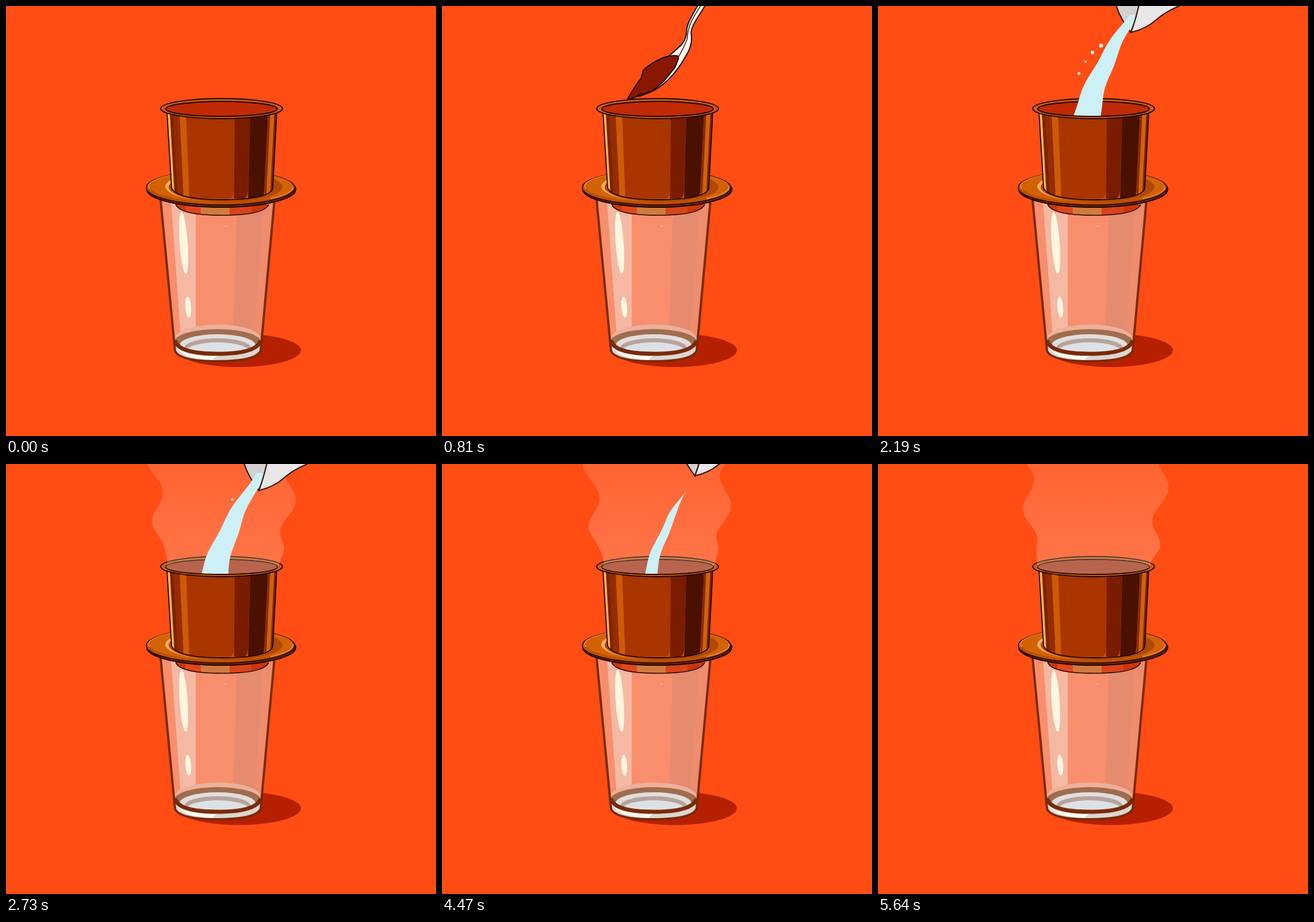
An HTML page that plays this animation: 748 px wide and 748 px high, repeating every 5670 ms.

```html
<!DOCTYPE html>
<html lang="en">
<head>
<meta charset="utf-8">
<title>Drip coffee</title>
<style>
  html, body { margin: 0; height: 100%; overflow: hidden; background: #ff4d14; }
  svg { display: block; width: 100%; height: 100%; }
</style>
</head>
<body>
<svg viewBox="0 0 748 748">
  <defs>
    <linearGradient id="mist" gradientUnits="userSpaceOnUse" x1="0" y1="0" x2="0" y2="190">
      <stop offset="0" stop-color="#fff" stop-opacity=".13"/>
      <stop offset="1" stop-color="#fff" stop-opacity=".23"/>
    </linearGradient>
    <clipPath id="glassClip"><path d="M269 338L294 600Q302 619 368 619Q434 619 443 600L467 338Z"/></clipPath>
    <clipPath id="cupClip"><path d="M280 184L288 316Q296 337 376 337Q456 337 464 318L471 184Z"/></clipPath>
    <clipPath id="plateClip"><ellipse cx="373" cy="316" rx="129" ry="30"/></clipPath>
    <clipPath id="baseClip"><path d="M295 344Q300 364 376 364Q450 364 457 345Z"/></clipPath>
    <clipPath id="mouthClip">
      <rect y="-200" width="748" height="379"/>
      <ellipse cx="375" cy="179" rx="96" ry="12"/>
    </clipPath>
  </defs>

  <rect width="748" height="748" fill="#ff4d14"/>
  <ellipse cx="405" cy="599" rx="108" ry="29" fill="#b52000"/>

  <!-- glass -->
  <g clip-path="url(#glassClip)">
    <rect x="260" y="330" width="220" height="300" fill="#f88e6c"/>
    <path d="M287 338H330V590H305Z" fill="#f5b8a3"/>
    <path d="M402 338H449L431 590H395Z" fill="#e58b6f"/>
    <path d="M449 338H470L446 590H431Z" fill="#ee8c6e"/>
    <ellipse cx="368" cy="579" rx="75" ry="25" fill="#ecb09b"/>
    <ellipse cx="368" cy="584" rx="75" ry="22" fill="#9f6d4d"/>
    <ellipse cx="368" cy="590" rx="66" ry="19" fill="#e0dedd"/>
    <ellipse cx="368" cy="595" rx="58" ry="17" fill="#b7a39b"/>
    <ellipse cx="368" cy="600" rx="54" ry="15" fill="#dde1e5"/>
    <path d="M292 586Q300 606 368 606Q436 606 445 586V622H292Z" fill="#ddd5d0"/>
    <path d="M296 592Q304 607 368 608L358 616Q304 613 296 592Z" fill="#fffaf2"/>
  </g>
  <g fill="none" stroke="#792b07">
    <path d="M269 338L294 600Q302 618 368 618Q434 618 443 600L467 338" stroke-width="4"/>
    <path d="M294 582Q300 605 368 605Q436 605 443 582" stroke-width="7"/>
  </g>
  <g fill="#fff6e0">
    <ellipse cx="309" cy="412" rx="7" ry="54" transform="rotate(-4 309 412)"/>
    <ellipse cx="317" cy="524" rx="5" ry="18" transform="rotate(-4 317 524)"/>
    <circle cx="382" cy="383" r="1" opacity=".7"/>
  </g>

  <!-- filter base and plate -->
  <g clip-path="url(#baseClip)">
    <rect x="290" y="340" width="170" height="26" fill="#cb3508"/>
    <rect x="312" y="340" width="27" height="26" fill="#e2471a"/>
    <rect x="339" y="340" width="50" height="26" fill="#d07a40"/>
    <rect x="389" y="340" width="38" height="26" fill="#d8431a"/>
  </g>
  <path d="M295 344Q300 364 376 364Q450 364 457 345" fill="none" stroke="#1c0700" stroke-width="1.5"/>
  <ellipse cx="374.500" cy="319" rx="129.500" ry="31" fill="#742200" stroke="#160600" stroke-width="2"/>
  <ellipse cx="373" cy="316" rx="129" ry="30" fill="#bd4f03" stroke="#160600" stroke-width="1.500"/>
  <g clip-path="url(#plateClip)">
    <ellipse cx="374" cy="313" rx="125" ry="28" fill="#d26205"/>
    <path d="M250 318A124 27 0 0 1 290 293M460 335A125 28 0 0 0 499 313" fill="none" stroke="#f49a45" stroke-width="1.500"/>
    <ellipse cx="374" cy="314" rx="97" ry="26" fill="#ffab5a"/>
    <ellipse cx="382" cy="315" rx="99" ry="26" fill="#b04703"/>
  </g>

  <!-- cup -->
  <g id="strips" clip-path="url(#cupClip)"></g>
  <path d="M280 184L288 316Q296 337 376 337Q456 337 464 318L471 184" fill="none" stroke="#160600" stroke-width="1.800"/>
  <g stroke="#160600" stroke-width="2">
    <ellipse cx="375" cy="178.500" rx="106" ry="17.500" fill="#cf5b0c"/>
    <ellipse cx="375" cy="179" rx="97" ry="13" fill="#c02a06"/>
  </g>

  <!-- moving parts -->
  <ellipse id="brew" cx="375" cy="179" rx="96" ry="12" fill="#a43819"/>
  <path id="steam" fill="url(#mist)"/>
  <g id="spoon" fill="#fff8e8" stroke="#160600" stroke-width="2">
    <path d="M333 157C341 140 366 110 398 84C412 72 424 64 425 46C425 30 436 16 446 -4L540 -150L556 -146L457 0C446 18 434 34 433 46C434 56 436 68 424 87C406 120 382 142 362 150C348 156 336 160 333 157Z"/>
    <path d="M337 154C365 148 405 112 426 58C427 35 436 20 451 -2L548 -148" fill="none" stroke-width="1.300"/>
  </g>
  <g clip-path="url(#mouthClip)">
    <path id="coffee" d="M323 161L335 141L346 126L350 112Q362 100 385 90Q400 85 410 87L411 92L405 107L397 117L385 132L366 148L345 154L331 161Z"
      fill="#8a1800" stroke="#160600" stroke-width="2" stroke-linejoin="round"/>
  </g>
  <g class="jug" stroke="#35160a" stroke-width="2.200">
    <path d="M400 -40L414 -2Q420 20 440 46L470 -40Z" fill="#d3d0cf"/>
  </g>
  <g clip-path="url(#mouthClip)" fill="#cdf0f6">
    <path id="water"/>
    <g id="drops"></g>
  </g>
  <g class="jug" stroke="#35160a" stroke-width="2.200">
    <path d="M462 -40Q452 14 440 46Q466 40 484 24Q500 10 524 0L600 -40Z" fill="#e8e6e6"/>
  </g>
</svg>

<script>
const LOOP = 5670, STEP = 30;
const $ = id => document.getElementById(id);
const clamp = u => Math.max(0, Math.min(1, u));
const ramp = (a, b, t) => clamp((t - a) / (b - a));
const smooth = (a, b, t) => { const u = ramp(a, b, t); return u * u * (3 - 2 * u); };
const line = pts => pts.map(p => p[0].toFixed(1) + ' ' + p[1].toFixed(1)).join('L');

// cup shading: right edge of each strip and its colour
const base = x => 289 + (x - 280) * 0.911;
let from = 280;
$('strips').innerHTML = '<rect x="275" y="180" width="200" height="160" fill="#c45204"/>' + [
  [285, '#ffb05c'], [291, '#7c2300'], [302, '#952c00'], [313, '#cf5a05'], [398, '#a93500'],
  [425, '#7a1c00'], [456, '#4a1000'], [460, '#8a2a00'], [467, '#d0620f'], [472, '#7c2300']
].map(([to, fill]) => {
  const d = `M${from} 184H${to}L${base(to)} 322Q${base(to) - 1} 332 ${base(to) - 6} 335H${base(from)}Z`;
  from = to;
  return `<path d="${d}" fill="${fill}"/>`;
}).join('');

// splashes: birth time, upward kick, radius
const drops = [
  [1938, 0, 2.5], [1995, 0, 2], [2055, 0, 3], [2130, 0, 3.5],
  [2700, 10, 2], [3050, 14, 2], [3390, 16, 1.5], [3850, 8, 2]
];

function drawSpoon(t) {
  const off = t < 740 ? 1 - smooth(60, 690, t) : smooth(790, 1660, t);
  const pose = `translate(${190 * off} ${-190 * off}) rotate(${20 * off} 333 157)`;
  $('spoon').setAttribute('transform', pose);
  const fall = ramp(820, 1060, t);
  $('coffee').setAttribute('transform', t < 820 ? pose : `translate(${-12 * clamp(fall * 2)} ${112 * fall * fall})`);
}

function drawJug(t) {
  const y = -50 * (1 - smooth(1500, 1770, t)) - 48 * smooth(4330, 4600, t);
  for (const part of document.querySelectorAll('.jug')) part.setAttribute('transform', `translate(0 ${y})`);
}

function drawWater(t) {
  const start = ramp(1760, 1990, t), end = ramp(4300, 4690, t);
  const top = 16 + 174 * end * end, bottom = 16 + 178 * start * start;
  const thin = clamp(1 - 1.25 * end);
  const left = [], right = [];
  for (let i = 0; i <= 40; i++) {
    const y = top + (bottom - top) * i / 40;
    const x = 455.9 - 0.74 * y + 0.00132 * y * y;
    let w = (11 + 0.18 * y) * thin / 2;
    if (end > 0) w *= clamp((y - top) / 35);
    if (start < 1) w *= clamp((bottom - y) / 40);
    const wave = Math.sin(y / 13 - t / 70) * Math.min(1.5, w / 5);
    left.push([x - w + wave, y - w * 0.15]);
    right.unshift([x + w + wave, y + w * 0.15]);
  }
  const on = start > 0 && thin > 0;
  $('water').setAttribute('d', on ? 'M' + line(left.concat(right)) + 'Z' : '');
  $('drops').innerHTML = drops.map(([born, kick, r]) => {
    const a = (t - born) / 60;
    if (a < 0 || a > 6) return '';
    return `<circle cx="${400 - 12 * a}" cy="${66 - kick * a + 2.9 * a * a}" r="${r}"/>`;
  }).join('');
}

function drawSteam(t) {
  const top = 172 * (1 - smooth(2220, 2780, t)) - 8;
  const show = smooth(2200, 2450, t);
  const rise = 0.121 * (t - 5640);
  const left = [], right = [];
  for (let i = 0; i <= 50; i++) {
    const y = top + (172 - top) * i / 50;
    const amp = 12 - 9 * smooth(105, 175, y);
    const foot = smooth(140, 172, y);
    const swing = peak => amp * Math.cos((y - peak + rise) * Math.PI / 55);
    left.push([257 + 0.09 * y + 6 * foot - swing(80), y]);
    right.unshift([497 - 0.08 * y - 10 * foot + swing(43), y]);
  }
  $('steam').setAttribute('d', `M${line(left)}L278 179A97 12 0 0 0 472 179L${line(right)}Q375 ${top - 24} ${line([left[0]])}Z`);
  $('steam').setAttribute('opacity', show);
  $('brew').setAttribute('opacity', show);
}

function frame(now) {
  const t = Math.floor(now % LOOP / STEP) * STEP;
  drawSpoon(t);
  drawJug(t);
  drawWater(t);
  drawSteam(t);
  requestAnimationFrame(frame);
}
frame(0);
</script>
</body>
</html>
```
